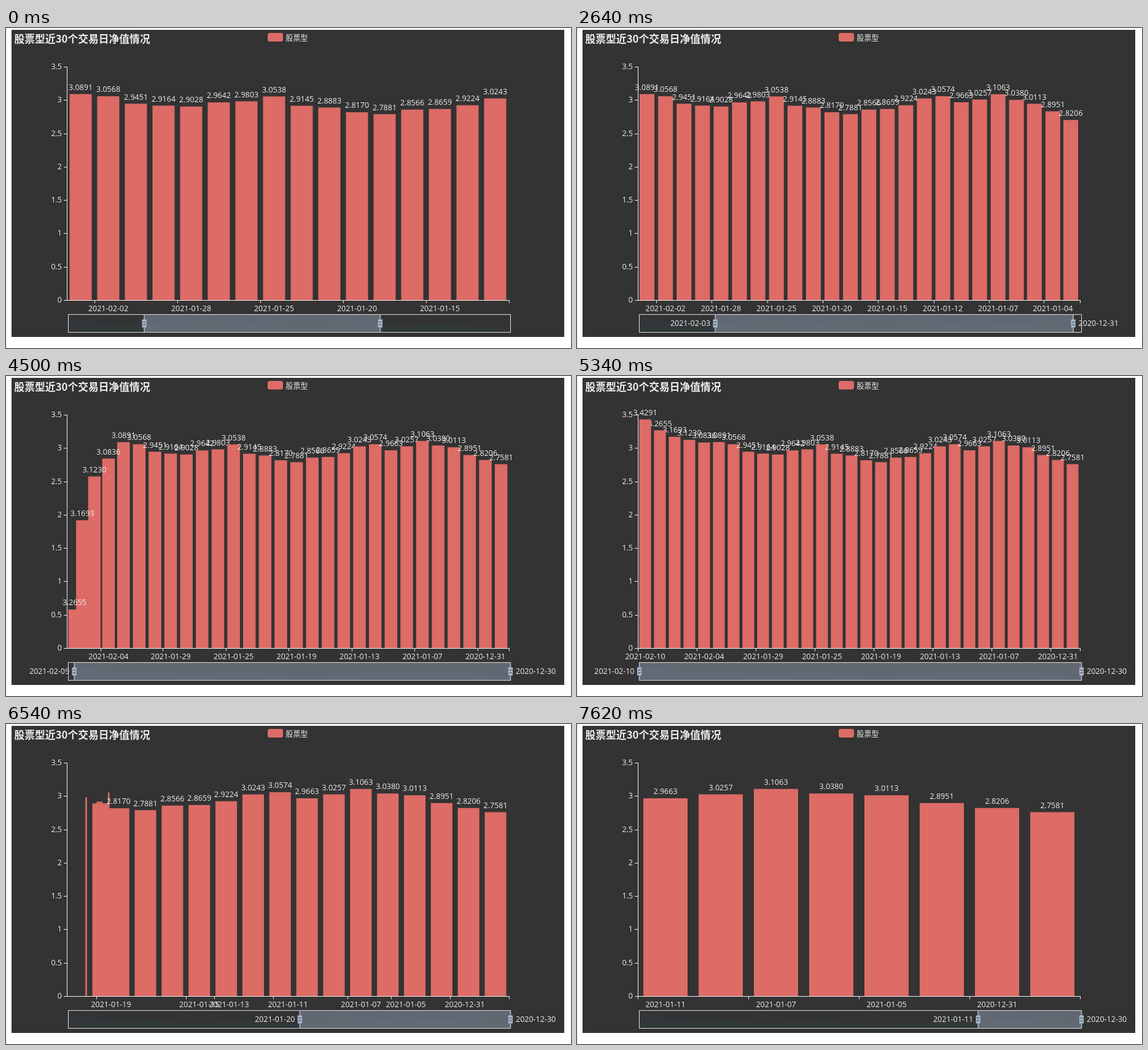
These frames come from a looping animation (920 by 521 pixels, 8 s). An HTML page with a canvas:

```html
<!DOCTYPE html>
<html lang="zh-CN">
<head>
<meta charset="utf-8">
<title>股票型</title>
<style>
  html, body { margin: 0; width: 100%; height: 100%; overflow: hidden; background: #fff; }
  canvas { display: block; width: 920px; height: 521px; }
</style>
</head>
<body>
<canvas id="stage"></canvas>
<script>
const LOOP = 8000;
const canvas = document.getElementById('stage');
const ctx = canvas.getContext('2d');
const ratio = window.devicePixelRatio || 1;
canvas.width = 920 * ratio;
canvas.height = 521 * ratio;

const RED = '#dd6b66', INK = '#eee', STEEL = '#a7b7cc';
const FONT = '12.5px "Open Sans", "Noto Sans", sans-serif';
const CJK = '"Noto Sans CJK SC", "Noto Sans CJK", "Noto Sans CJK JP", sans-serif';
const plot = { x: 99, base: 443, w: 720, h: 380, max: 3.5 };
const rail = { x: 101.5, y: 466.5, w: 720, h: 29 };

const values = [
  3.4291, 3.2655, 3.1693, 3.1230, 3.0836, 3.0891, 3.0568, 2.9451, 2.9164, 2.9028,
  2.9642, 2.9803, 3.0538, 2.9145, 2.8883, 2.8170, 2.7881, 2.8566, 2.8659, 2.9224,
  3.0243, 3.0574, 2.9663, 3.0257, 3.1063, 3.0380, 3.0113, 2.8951, 2.8206, 2.7581
];
const last = values.length - 1;
const dates = tradingDays(new Date(Date.UTC(2021, 1, 10)), values.length);

// Working days counted backwards, without New Year's Day.
function tradingDays(day, count) {
  const list = [];
  while (list.length < count) {
    const text = day.toISOString().slice(0, 10);
    if (day.getUTCDay() % 6 && !text.endsWith('01-01')) list.push(text);
    day.setUTCDate(day.getUTCDate() - 1);
  }
  return list;
}

// Slider handles: [time, position in days].
const leftPath = [
  [4150, 4.98], [4500, 0.4], [4530, 0], [5535, 0], [5880, 4.82],
  [6540, 15.17], [6960, 20.5], [7240, 22.22]
];
const rightPath = [
  [1430, 20.46], [1524, 20.9], [1582, 22.7], [1640, 23.3], [1698, 24], [1740, 24.59],
  [1880, 27.85], [2060, 22.3], [2160, 22.3], [2400, 28.46], [2650, 28.46], [2780, 29]
];
// Chart refreshes while dragging: [first, end, period].
const refreshes = [
  [1524, 2460, 58], [2690, 2890, 62], [4154, 4610, 71], [5521.6, 7330, 71.1]
];

function along(path, t) {
  const next = path.findIndex(p => p[0] > t);
  if (next === 0) return path[0][1];
  if (next < 0) return path[path.length - 1][1];
  const [t0, a] = path[next - 1], [t1, b] = path[next];
  return a + (b - a) * (t - t0) / (t1 - t0);
}

const span = t => [Math.round(along(leftPath, t)), Math.round(along(rightPath, t))];
const events = [-2000];
for (const [from, to, period] of refreshes)
  for (let t = from; t < to; t += period) events.push(t);

const tween = (from, to, start, duration) => ({ from, to, start, duration });

function current(a, t) {
  const rest = 1 - Math.min(1, (t - a.start) / a.duration);
  const k = 1 - rest ** 3;
  return a.to.map((v, i) => a.from[i] + (v - a.from[i]) * k);
}

function retarget(a, t, to) {
  Object.assign(a, tween(current(a, t), to, t, 300));
}

// Replays the refreshes up to time t.
function replay(t) {
  let bars = [], shown = [0, last];
  const marks = new Map();
  for (const at of events) {
    if (at > t) break;
    const [s, e] = shown = span(at);
    const slots = e - s + 1, unit = plot.w / slots;
    const step = slots > 24 ? 4 : slots > 15 ? 3 : 2;

    bars = bars.filter(b => !b.gone || at - b.start < 300);
    for (const b of bars) {
      if (b.gone || (b.day >= s && b.day <= e)) continue;
      const [x, , h] = current(b, at);
      retarget(b, at, [x, 0, h]);
      b.gone = true;
    }
    for (let day = s; day <= e; day++) {
      const x = plot.x + (day - s) * unit;
      const box = [x + unit * 0.1, unit * 0.8, plot.h * values[day] / plot.max];
      const bar = bars.find(b => b.day === day && !b.gone);
      if (bar) retarget(bar, at, box);
      else bars.push({ day, ...tween([box[0], box[1], 0], box, at, 1000) });

      const mark = [x, x + unit / 2];
      if (day % step) marks.delete(day);
      else if (marks.has(day)) retarget(marks.get(day), at, mark);
      else marks.set(day, tween(mark, mark, at, 300));
    }
    for (const day of [...marks.keys()])
      if (day < s || day > e) marks.delete(day);
  }
  return { bars, marks, shown };
}

function rect(x, y, w, h, color) {
  ctx.fillStyle = color;
  ctx.fillRect(x, y, w, h);
}

function text(str, x, y, align = 'center', font = FONT) {
  ctx.font = font;
  ctx.textAlign = align;
  ctx.fillStyle = INK;
  ctx.fillText(str, x, y);
}

function drawFrame() {
  rect(0, 0, 920, 521, '#fff');
  rect(0, 0, 1, 521, '#e2eaee');
  rect(9, 3, 900, 500, '#333');
  text('股票型近30个交易日净值情况', 13.5, 18, 'left', 'bold 16.8px ' + CJK);
  ctx.fillStyle = RED;
  ctx.beginPath();
  ctx.roundRect(426, 8, 25, 14, 3.5);
  ctx.fill();
  text('股票型', 455.5, 16, 'left', '12px ' + CJK);
}

function drawAxes(marks, t) {
  rect(plot.x, 63, 1, 381, INK);
  rect(plot.x, plot.base, plot.w + 1, 1, INK);
  for (let v = 0; v <= plot.max; v += 0.5) {
    const y = Math.round(plot.base - plot.h * v / plot.max);
    rect(94, y, 5, 1, INK);
    text(String(v), 91, y + 0.5, 'right');
  }
  rect(plot.x + plot.w, plot.base, 1, 5, INK);
  for (const [day, mark] of marks) {
    const [tick, label] = current(mark, t);
    rect(Math.round(tick), plot.base, 1, 5, INK);
    text(dates[day], label, 458);
  }
}

function drawBars(bars, t) {
  for (const b of bars) {
    const [x, w, h] = current(b, t);
    if (w < 0.05) continue;
    rect(x, plot.base - h, w, h, RED);
    if (!b.gone) text(values[b.day].toFixed(4), x + w / 2, plot.base - h - 10);
  }
}

function drawHandle(x) {
  rect(x - 0.8, rail.y, 1.6, rail.h, STEEL);
  rect(x - 3.6, 474.5, 7.2, 13, STEEL);
  rect(x - 2.1, 478.1, 4.2, 1.3, '#4a4f57');
  rect(x - 2.1, 482.6, 4.2, 1.3, '#4a4f57');
}

function drawSlider(shown, t) {
  const place = day => rail.x + day / last * rail.w;
  const low = Math.min(...values), high = Math.max(...values), pad = (high - low) * 0.3;
  const bottom = rail.y + rail.h;
  ctx.beginPath();
  ctx.moveTo(rail.x, bottom);
  values.forEach((v, i) =>
    ctx.lineTo(place(i), bottom - rail.h * (v - low + pad) / (high - low + 2 * pad)));
  ctx.lineTo(rail.x + rail.w, bottom);
  ctx.fillStyle = 'rgba(47,69,84,.2)';
  ctx.fill();

  const left = place(along(leftPath, t)), right = place(along(rightPath, t));
  rect(left, rail.y, right - left, rail.h, 'rgba(167,183,204,.4)');
  ctx.strokeStyle = '#ddd';
  ctx.lineWidth = 1;
  ctx.strokeRect(rail.x, rail.y, rail.w, rail.h);
  drawHandle(left);
  drawHandle(right);
  if (t >= 180 && (t < 660 || t >= 720)) {
    text(dates[shown[0]], left - 8, 482, 'right');
    text(dates[shown[1]], right + 8.5, 482, 'left');
  }
}

function render() {
  const t = performance.now() % LOOP;
  const { bars, marks, shown } = replay(t);
  ctx.setTransform(ratio, 0, 0, ratio, 0, 0);
  ctx.textBaseline = 'middle';
  drawFrame();
  drawAxes(marks, t);
  drawBars(bars, t);
  drawSlider(shown, t);
  requestAnimationFrame(render);
}
render();
</script>
</body>
</html>
```
